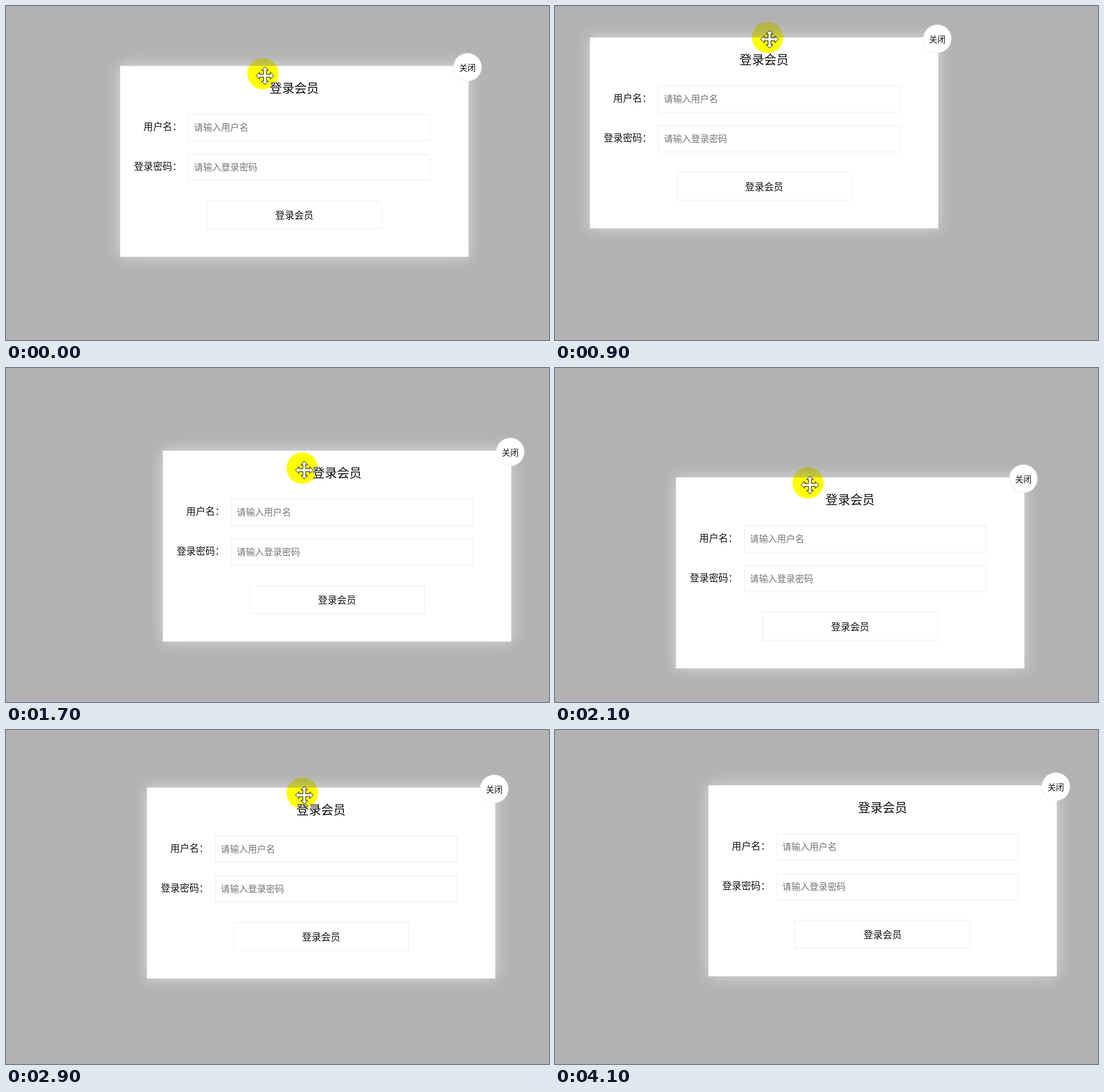
These frames come from a looping animation (953x587 px, 4.2 s). An HTML page with a canvas:

```html
<!DOCTYPE html>
<html lang="zh-CN">
<head>
<meta charset="utf-8">
<style>
  html, body { margin: 0; width: 100%; height: 100%; overflow: hidden; background: #b2b2b2; }
  canvas { display: block; }
</style>
</head>
<body>
<canvas id="stage" width="953" height="587"></canvas>
<script>
const ctx = document.getElementById('stage').getContext('2d');
const STEP = 100, LOOP = 4200;
const W = 612, H = 336;
const GRAB = { x: 251, y: 14 };   // pointer offset inside the panel
const DROP = 30, EXIT = 33;       // steps at which the drag ends and the pointer is last seen

// Key points of the drag
const key = (step, x, y) => ({ step, x, y });
const path = [
  key(0, 200, 105), key(6, 14, 104), key(9, 61, 55), key(10, 122, 41), key(13, 195, 49),
  key(17, 275, 145), key(21, 212, 192), key(24, 161, 163), key(27, 170, 123), key(DROP, 269, 97)
];

function slope(i, axis) {
  const a = path[i - 1], b = path[i + 1];
  return a && b ? (b[axis] - a[axis]) / (b.step - a.step) : 0;
}

// Smooth Hermite curve through the key points
function panelAt(step) {
  const next = path.findIndex(p => p.step > step);
  if (next < 0) return path[path.length - 1];
  const i = next - 1, a = path[i], b = path[next];
  const span = b.step - a.step, u = (step - a.step) / span;
  const along = axis => {
    const bend = u * (1 - u) * span * (slope(i, axis) * (1 - u) - slope(next, axis) * u);
    return Math.round(a[axis] + (b[axis] - a[axis]) * u * u * (3 - 2 * u) + bend);
  };
  return { x: along('x'), y: along('y') };
}

// The panel trails the pointer by one step; later the pointer dips in at the bottom edge
function pointerAt(step) {
  if (step <= EXIT) {
    const { x, y } = panelAt(step && step + 1);
    const away = Math.max(0, (step - DROP) / (EXIT - DROP));
    return { x: x + GRAB.x - 152 * away, y: y + GRAB.y + 166 * away };
  }
  const dip = Math.abs(step - 39);
  return dip < 2 ? { x: 612, y: 593 + 13 * dip } : null;
}

function text(str, x, y, size, align = 'center', color = '#111') {
  ctx.font = `${size}px "Noto Sans CJK SC", "Noto Sans CJK", sans-serif`;
  ctx.textAlign = align;
  ctx.fillStyle = color;
  ctx.fillText(str, x, y + size * 0.38);
}

function box(x, y, w, h) {
  ctx.strokeStyle = '#ededed';
  ctx.strokeRect(x + 0.5, y + 0.5, w, h);
}

function disc(x, y, r, color) {
  ctx.fillStyle = color;
  ctx.beginPath();
  ctx.arc(x, y, r, 0, 2 * Math.PI);
  ctx.fill();
}

function field(label, hint, y) {
  text(label, 108.5, y + 21.5, 16.8, 'right');
  box(120, y, 424, 46);
  text(hint, 130, y + 22.5, 15.9, 'left', '#757575');
}

function drawPanel({ x, y }) {
  ctx.save();
  ctx.translate(x, y);
  ctx.fillStyle = '#fff';
  ctx.shadowColor = '#ddd';
  ctx.shadowBlur = 24;
  ctx.fillRect(0, 0, W, H);
  ctx.shadowColor = 'transparent';
  box(0, 0, W - 1, H - 1);
  text('登录会员', W / 2, 38.5, 21.6);
  field('用户名：', '请输入用户名', 85);
  field('登录密码：', '请输入登录密码', 155);
  box(152, 237, 307, 49);
  text('登录会员', W / 2, 263, 16.8);
  disc(W - 2, 2.5, 25, '#ededed');
  disc(W - 2, 2.5, 24, '#fff');
  text('关闭', W - 2, 3.5, 14.4);
  ctx.restore();
}

// Four-way move arrow: one arm, turned four times
function drawMoveArrow() {
  const shaft = 2.5, barb = 6, neck = 9.5, tip = 15.5;
  ctx.beginPath();
  for (let i = 0; i < 4; i++) {
    ctx.lineTo(-shaft, -neck);
    ctx.lineTo(-barb, -neck);
    ctx.lineTo(0, -tip);
    ctx.lineTo(barb, -neck);
    ctx.lineTo(shaft, -neck);
    ctx.lineTo(shaft, -shaft);
    ctx.rotate(Math.PI / 2);
  }
  ctx.closePath();
  ctx.fillStyle = '#fff';
  ctx.strokeStyle = '#000';
  ctx.fill();
  ctx.stroke();
}

function drawPointer({ x, y }) {
  ctx.save();
  ctx.translate(x, y);
  ctx.globalCompositeOperation = 'difference';
  disc(0, 0, 27.5, '#00f');
  ctx.globalCompositeOperation = 'source-over';
  ctx.translate(3.5, 3.5);
  drawMoveArrow();
  ctx.restore();
}

function frame() {
  const step = Math.floor(performance.now() % LOOP / STEP);
  const pointer = pointerAt(step);
  ctx.fillStyle = '#b2b2b2';
  ctx.fillRect(0, 0, 953, 587);
  drawPanel(panelAt(step));
  if (pointer) drawPointer(pointer);
  requestAnimationFrame(frame);
}
frame();
</script>
</body>
</html>
```
